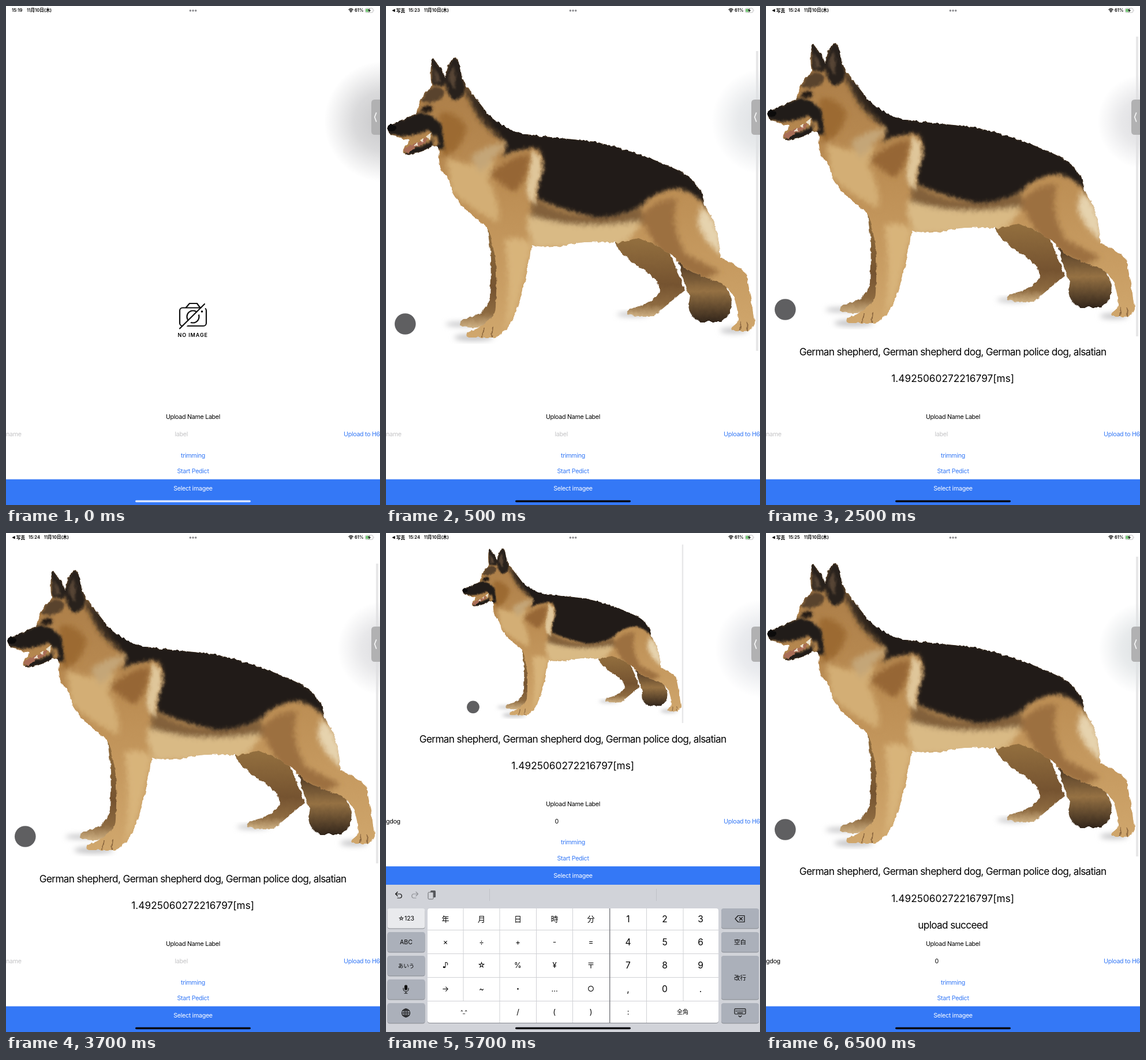
Write an HTML page that moves like this. It is 648 by 864 pixels and loops after 8000 ms.

```html
<!DOCTYPE html>
<html lang="ja">
<head>
<meta charset="utf-8">
<title>Image classifier demo</title>
<style>
html, body { margin: 0; width: 100%; height: 100%; overflow: hidden; background: #fff; }
svg { display: block; width: 648px; height: 864px; }
text { font: 10.7px Inter, "Noto Sans CJK JP", "Noto Sans CJK", sans-serif; font-optical-sizing: none; letter-spacing: -.3px; white-space: pre; }
.mid { text-anchor: middle; }
.link { fill: #3478f6; }
.big { font-size: 17.2px; letter-spacing: -.65px; text-anchor: middle; }
.status { font-size: 7.6px; font-weight: 600; letter-spacing: 0; }
.key { letter-spacing: 0; text-anchor: middle; }
.line { fill: none; stroke: #111; stroke-width: 1.2; stroke-linecap: round; stroke-linejoin: round; }
</style>
</head>
<body>
<svg viewBox="0 0 648 864">
  <defs>
    <linearGradient id="coat" x2="0" y2="1">
      <stop offset="0" stop-color="#a87a45"/><stop offset=".5" stop-color="#bd8f55"/><stop offset="1" stop-color="#d0a76d"/>
    </linearGradient>
    <linearGradient id="brush" x2="0" y2="1">
      <stop offset="0" stop-color="#4a3522"/><stop offset=".5" stop-color="#957143"/><stop offset="1" stop-color="#33261b"/>
    </linearGradient>
    <linearGradient id="far" x2="0" y2="1">
      <stop offset="0" stop-color="#94703f"/><stop offset=".6" stop-color="#755330"/><stop offset=".85" stop-color="#8d6a40"/><stop offset="1" stop-color="#cfb184"/>
    </linearGradient>
    <radialGradient id="halo">
      <stop offset="0" stop-color="currentColor" stop-opacity="1"/>
      <stop offset=".5" stop-color="currentColor" stop-opacity=".65"/>
      <stop offset=".8" stop-color="currentColor" stop-opacity=".25"/>
      <stop offset="1" stop-color="currentColor" stop-opacity="0"/>
    </radialGradient>
    <filter id="soft"><feGaussianBlur stdDeviation="5"/></filter>
    <filter id="fur" x="-5%" y="-5%" width="110%" height="110%" color-interpolation-filters="sRGB">
      <feTurbulence type="fractalNoise" baseFrequency=".14 .1" numOctaves="2" seed="4"/>
      <feDisplacementMap in="SourceGraphic" scale="6" xChannelSelector="R" yChannelSelector="G"/>
    </filter>
    <path id="body" d="M2 211Q3 205 14 203Q34 198 53 184Q57 165 68 151L79 138Q75 112 80 91Q84 87 103 124Q106 100 118 90Q124 86 127 102Q130 125 142 143Q158 162 178 189Q205 213 240 223Q300 228 362 235Q440 253 505 284Q548 304 552 345Q575 375 580 435Q612 452 624 464Q632 500 638 545Q639 562 620 563L600 563Q594 556 608 549Q612 530 603 505Q592 480 560 472Q520 462 497 432Q470 412 437 402L400 410Q340 405 310 415Q280 420 252 414Q246 460 236 495Q228 530 216 548Q205 570 188 574L142 574Q134 568 150 562Q190 545 190 520Q194 450 186 420Q180 385 172 380Q130 350 116 325Q112 300 96 285Q90 268 92 246Q88 240 80 244Q55 258 32 257Q27 248 38 239L40 232Q20 230 5 220Z"/>
    <clipPath id="inside"><use href="#body"/></clipPath>
  </defs>
  <rect width="648" height="864" fill="#fff"/>

  <g id="empty">
    <g class="line" style="stroke-width:2.2">
      <rect x="301" y="522.5" width="46" height="31.5" rx="5"/>
      <path d="M312 522L318 515H331L336 522"/>
      <circle cx="324" cy="538" r="10.5"/>
      <path d="M302 562L347 518" stroke="#fff" stroke-width="5"/>
      <path d="M301 558.5L344 516"/>
    </g>
    <circle cx="339.5" cy="529" r="1.8"/>
    <text x="323.7" y="573" class="mid" style="font-size:9px;font-weight:600;letter-spacing:.9px">NO IMAGE</text>
  </g>

  <g id="photo">
    <g fill="#c4c4c6" filter="url(#soft)">
      <ellipse cx="130" cy="551" rx="27" ry="4"/><ellipse cx="152" cy="574" rx="34" ry="6"/>
      <ellipse cx="428" cy="534" rx="28" ry="4"/><ellipse cx="603" cy="562" rx="24" ry="5"/>
    </g>
    <g filter="url(#fur)">
      <path fill="url(#brush)" d="M506 440Q515 480 526 502Q518 535 545 547H580Q602 532 598 508Q590 478 570 460Z"/>
      <path fill="url(#far)" d="M397 410Q412 437 442 454Q474 474 475 494Q462 513 438 520Q416 525 418 534Q424 538 464 537Q490 515 517 492Q505 455 490 425L440 400Z"/>
      <path fill="url(#far)" d="M176 386Q184 440 181 505Q172 532 150 538Q128 542 128 552Q136 559 168 556L200 530V400Z"/>
      <use href="#body" fill="url(#coat)"/>
      <g clip-path="url(#inside)">
        <g filter="url(#soft)">
          <path fill="#d3ae74" d="M105 262Q160 285 190 265L176 300Q200 340 195 375Q140 350 112 320Z"/>
          <path fill="#966635" d="M180 290Q225 255 250 258Q244 305 222 322Q200 310 180 290Z"/>
          <path fill="#9c6a33" d="M92 185Q120 180 140 210Q130 255 96 262Z"/>
          <path fill="#82603a" d="M255 330Q330 385 440 348L450 375Q340 395 250 365Z"/>
          <path fill="#d9ba85" d="M246 362Q330 390 440 372Q435 400 400 416L260 420Q240 390 246 362Z"/>
          <path fill="#e6d3ae" d="M546 346Q580 370 584 432Q552 412 540 375Z"/>
          <path fill="#9c7040" d="M440 365Q470 330 505 335Q490 380 520 430L580 460L550 474Q500 450 470 420Z"/>
          <path fill="#d8b47a" d="M205 405Q235 395 254 414L225 530L205 565Q218 480 205 405Z"/>
          <path fill="#33261c" d="M128 130Q180 180 250 218L236 248Q190 232 160 192Z"/>
          <path fill="#c4a678" d="M146 262Q180 234 214 240Q192 252 165 290Z"/>
        </g>
        <path fill="#211b18" style="filter:blur(3px)" d="M172 180Q205 210 240 220Q300 222 362 230Q440 248 505 279Q552 302 558 352Q535 318 500 316Q462 322 440 348Q400 366 365 366Q300 352 264 334Q258 320 270 290Q278 262 262 246Q225 245 200 262Q222 235 190 212Z"/>
        <path fill="#dfc69a" style="filter:blur(3px)" d="M254 250Q276 262 267 295Q255 325 260 345Q236 330 247 298Z"/>
        <g style="filter:blur(2px)">
          <path fill="#28211c" d="M77 86Q88 90 104 122L101 139L80 137ZM102 125Q106 98 120 86L130 100L138 142Q134 163 116 163Q103 150 102 125Z"/>
          <path fill="#574535" d="M82 106Q90 114 95 131L85 134ZM108 127Q111 112 117 103Q123 128 119 145Z"/>
          <path fill="#59432d" d="M73 143Q92 136 102 148Q98 164 76 168L60 165Z"/>
          <path fill="#211c19" d="M-2 204Q34 196 54 184Q78 184 96 206L101 248L80 247Q88 222 72 214Q45 231 4 222ZM30 259Q60 260 92 240L87 222Q73 243 40 246Z"/>
          <ellipse cx="71" cy="178" rx="11" ry="6" fill="#241b15"/>
        </g>
        <path fill="#a96d57" d="M31 250Q37 239 54 237Q66 232 72 227Q70 238 56 243Q45 247 40 255Z"/>
        <path fill="#eee4d0" d="M58 231L62 237L66 229ZM69 226L75 231L79 219ZM48 242L53 237L56 243Z"/>
        <ellipse cx="9" cy="211" rx="8" ry="6" fill="#0c0b0b"/>
        <path class="line" style="stroke:#8d6840;stroke-width:2" d="M170 557L166 572M185 556L183 573M615 548L613 562M626 547L625 562"/>
      </g>
    </g>
    <circle cx="33.3" cy="550.5" r="18.3" fill="#5f5f61"/>
    <rect x="641" y="78" width="4" height="519" fill="#e7e7e8"/>
  </g>

  <g id="answer">
    <text class="big" x="323.7" y="604.5">German shepherd, German shepherd dog, German police dog, alsatian</text>
    <text class="big" x="323.7" y="651" style="letter-spacing:.05px">1.4925060272216797[ms]</text>
    <text class="big" x="323.7" y="697.5" id="done">upload succeed</text>
  </g>

  <g id="form">
    <text class="mid" x="324" y="715">Upload Name Label</text>
    <text id="name" x="0" y="745.3"></text>
    <text id="label" x="292.5" y="745.3"></text>
    <text class="link" x="585" y="745.3">Upload to H6</text>
    <text class="link mid" x="324" y="781.7">trimming</text>
    <text class="link mid" x="324" y="809">Start Pedict</text>
    <rect y="819.5" width="648" height="44.5" fill="#3478f6"/>
    <text class="mid" x="324" y="839.3" fill="#fff">Select imagee</text>
  </g>

  <g id="keyboard">
    <rect y="609" width="648" height="255" fill="#d1d3d9"/>
    <path d="M179.5 616V637M468.5 616V637" stroke="#bfc1c7"/>
    <path class="line" d="M20 621.5L16.5 625L20 628.5M17 625H24.5A3.6 3.6 0 0 1 24.5 632H20"/>
    <path class="line" style="stroke:#909297" d="M52 621.5L55.5 625L52 628.5M55 625H47.5A3.6 3.6 0 0 0 47.5 632H52"/>
    <rect x="77" y="619" width="9" height="12" rx="1.5" fill="#55575b"/>
    <rect x="73" y="622" width="9" height="12" rx="1.5" fill="#d1d3d9" stroke="#66686c"/>
    <g id="keys"></g>
    <g class="line">
      <rect x="32.5" y="783" width="4" height="8" rx="2" fill="#111"/>
      <path d="M30 788V789.5A4.5 4.5 0 0 0 39 789.5V788M34.5 794V797M32 797H37"/>
      <circle cx="34.5" cy="831" r="7"/><ellipse cx="34.5" cy="831" rx="3.2" ry="7"/>
      <path d="M34.5 824V838M27.5 831H41.5M29 827H40M29 835H40"/>
      <path d="M605 668L610 662.5H621V673.5H610ZM612.5 665.5L617.5 670.5M617.5 665.5L612.5 670.5"/>
      <rect x="604" y="823.5" width="19" height="9.5" rx="1.5"/>
      <path d="M606.5 826H621M606.5 828.3H621" stroke-dasharray=".8 2"/>
      <path d="M609 830.8H618M611 836L613.5 838L616 836"/>
    </g>
  </g>

  <circle id="glow" cx="656" cy="200" fill="url(#halo)"/>
  <path d="M648 162H639Q633 162 633 168V217Q633 223 639 223H648Z" fill="#b1b1b2"/>
  <path class="line" style="stroke:#f4f4f4;stroke-width:1.8" d="M641.5 185L638.7 192.3L641.5 200"/>

  <g id="back">
    <path d="M10.3 7.7L15.6 5V10.4Z"/>
    <text class="status" x="17.8" y="10.5">写真</text>
  </g>
  <text class="status" id="clock" y="10.3"></text>
  <text class="status" id="date" y="10.3">11月10日(木)</text>
  <path d="M319.3 8H319.4M324 8H324.1M328.7 8H328.8" stroke="#88888c" stroke-width="3.4" stroke-linecap="round"/>
  <g class="line" style="stroke-width:1.4;stroke-linecap:butt">
    <path d="M593.6 6.6Q597.6 2.8 601.6 6.6M595.1 8.4Q597.6 6 600.1 8.4"/>
  </g>
  <path d="M597.6 11.2L596 9.4Q597.6 8.2 599.2 9.4Z"/>
  <text class="status" x="604" y="10.3">61%</text>
  <rect x="622.4" y="3.9" width="13.6" height="7.4" rx="2.2" fill="#fff" stroke="#a4a4a6" stroke-width=".7"/>
  <rect x="623.4" y="4.9" width="7.2" height="5.4" rx="1.2" fill="#65c466"/>
  <path d="M637 6.4Q638.4 7.6 637 8.8Z" fill="#a4a4a6"/>
  <path d="M630.6 3.2L626 8.2H628.8L627.8 12L632.6 6.9H629.7Z" stroke="#fff" stroke-width=".5"/>
  <rect id="home" x="224" y="855.8" width="200" height="3.4" rx="1.7"/>
</svg>
<script>
const $ = id => document.getElementById(id);
const ns = 'http://www.w3.org/2000/svg';

function add(tag, attrs, content = '') {
  const el = document.createElementNS(ns, tag);
  for (const k in attrs) el.setAttribute(k, attrs[k]);
  el.textContent = content;
  $('keys').append(el);
}
const rect = (x, y, width, height, fill, rx = 0) => add('rect', {x, y, width, height, fill, rx});
const glyph = (s, x, y, size) =>
  add('text', {class: 'key', x, y: y + size * .365, style: `font-size:${size}px`}, s);

function sideKey(x, y, h, s, size, fill = '#abb0ba') {
  rect(x, y + 1, 65, h, '#888b92', 4);
  rect(x, y, 65, h, fill, 4);
  glyph(s, x + 32.5, y + h / 2, size);
}

function buildKeys() {
  const rowY = [650, 691, 732, 773, 814];
  ['☆123', 'ABC', 'あいう', '', ''].forEach((s, i) =>
    sideKey(2.5, rowY[i], 34.5, s, i == 2 ? 9.5 : 10.5, i ? undefined : '#e9eaed'));
  sideKey(581, 650, 34.5, '', 10);
  sideKey(581, 691, 34.5, '空白', 10.5);
  sideKey(581, 732, 75.5, '改行', 10.5);
  sideKey(581, 814, 34.5, '', 10);

  rect(72, 651, 504, 198, '#888b92', 4);
  rect(72, 650, 504, 198, '#fff', 4);
  for (const y of [687, 728, 769, 810]) rect(72, y, 504, 1, '#d0d1d5');
  [133.5, 196.5, 260, 323, 387, 451, 514.5].forEach((x, i) =>
    rect(x, 650, i == 4 ? 1.4 : 1, i % 6 ? 198 : 160, i == 4 ? '#77797e' : '#d0d1d5'));

  const colX = [103, 165.5, 228.5, 292, 355, 419.5, 483, 545];
  ['年月日時分123', '×÷+-=456', '♪☆%¥〒789', '→~・…○,0.'].forEach((row, r) =>
    [...row].forEach((s, c) =>
      glyph(s, colX[c], [668, 708, 748.5, 789.5][r], c > 4 ? 15.5 : 13)));
  [['^_^', 135, 9], ['/', 228.5, 13], ['(', 291.5, 13], [')', 355, 13], [':', 419.5, 13], ['全角', 514, 10]]
    .forEach(([s, x, size]) => glyph(s, x, 829, size));
}

const scenes = [
  {at: 0, clock: '15:19', glow: [105, '#c6c6c8']},
  {at: 500, clock: '15:23', glow: [92, '#dcdfe2'], photo: 'translate(0 0)'},
  {at: 2500, clock: '15:24', glow: [82, '#dcdcdf'], photo: 'translate(0 -25)', answer: 0},
  {at: 4500, clock: '15:24', glow: [86, '#dfe1e6'], photo: 'translate(131.1 -26.4) scale(.5954)', answer: -242, typing: true, filled: true},
  {at: 6500, clock: '15:25', glow: [80, '#dce0e2'], photo: 'translate(0 -37)', answer: -12.3, filled: true, done: true}
];

const show = (id, on) => $(id).style.display = on ? '' : 'none';
const shift = (id, y) => $(id).setAttribute('transform', `translate(0 ${y})`);

function render(s) {
  const started = !!s.photo;
  show('empty', !started);
  show('photo', started);
  show('back', started);
  if (started) $('photo').setAttribute('transform', s.photo);
  show('answer', s.answer !== undefined);
  shift('answer', s.answer || 0);
  show('done', s.done);
  show('keyboard', s.typing);
  shift('form', s.typing ? -242.3 : 0);
  $('name').textContent = s.filled ? 'gdog' : 'name';
  $('label').textContent = s.filled ? '0' : 'label';
  for (const id of ['name', 'label']) $(id).setAttribute('fill', s.filled ? '#000' : '#c4c4c6');
  $('clock').textContent = s.clock;
  $('clock').setAttribute('x', started ? 39 : 10);
  $('date').setAttribute('x', started ? 65.7 : 36);
  $('glow').setAttribute('r', s.glow[0]);
  $('halo').style.color = s.glow[1];
  $('home').setAttribute('fill', started ? '#080a10' : '#dbe6fd');
}

let current;
function tick(now) {
  const t = now % 8000;
  const scene = scenes.findLast(s => s.at <= t);
  if (scene !== current) render(current = scene);
  requestAnimationFrame(tick);
}

buildKeys();
tick(0);
</script>
</body>
</html>
```
